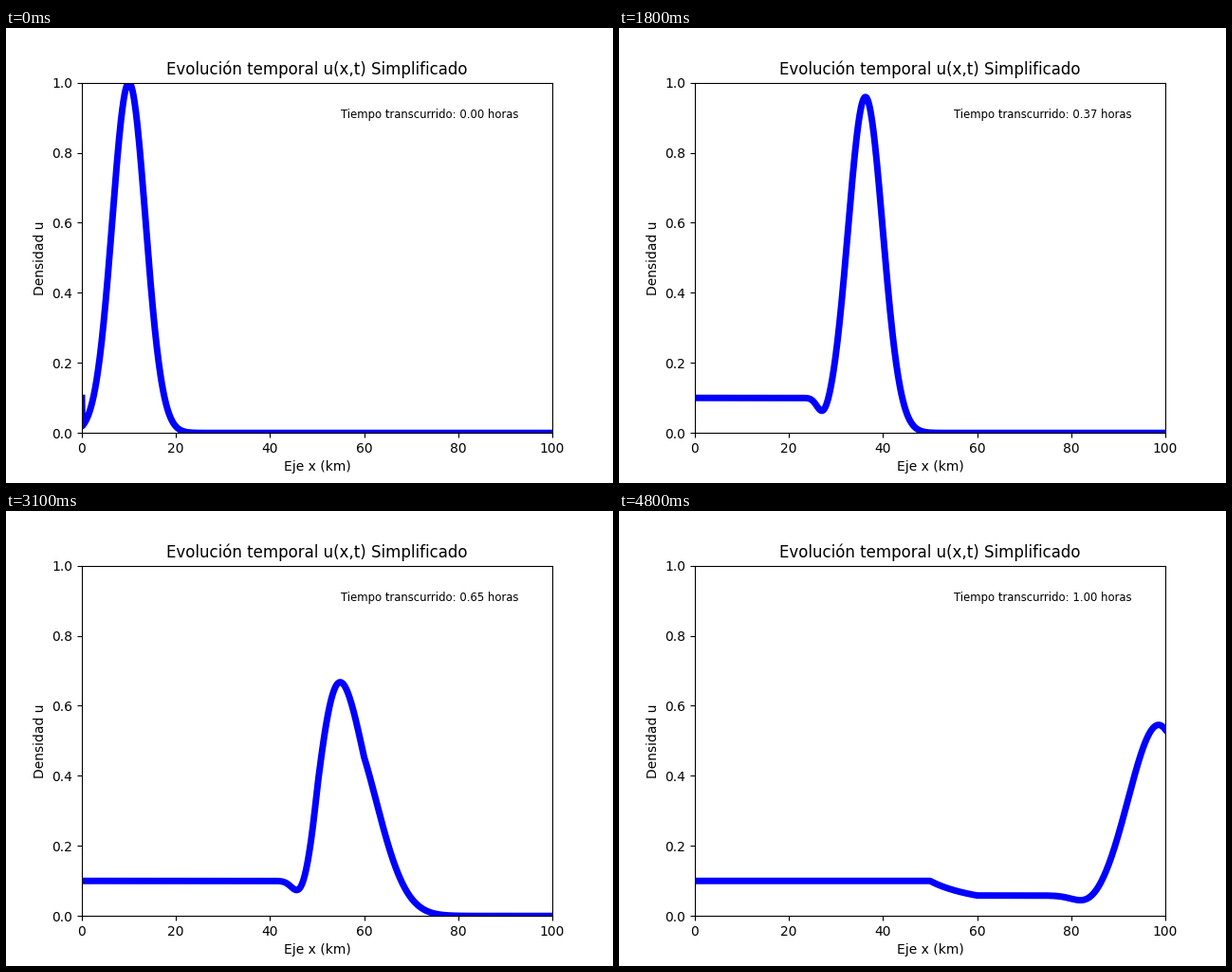
These frames come from a looping animation (640x480 px, 4.9 s). A matplotlib script:

```python
import numpy as np
import matplotlib.pyplot as plt
from matplotlib.animation import FuncAnimation

FRAMES = 49
INTERVAL = 100          # ms
STEPS = 25              # solver steps per frame
FRAME_HOURS = 0.0208333

x = np.linspace(0, 100, 1001)
speed = np.interp(x, [50, 60], [70, 120])
ratio = 1 / speed.max()  # dt / dx at the stability limit


def advance(u):
    """One conservative upwind step with a fixed inflow."""
    flux = speed * u
    new = u.copy()
    new[1:] -= ratio * np.diff(flux)
    return new


def solve():
    u = np.exp(-(x - 10) ** 2 / 25)
    u[0] = 0.1
    states = [u]
    for _ in range(FRAMES - 1):
        for _ in range(STEPS):
            u = advance(u)
        states.append(u)
    return states


states = solve()

fig, ax = plt.subplots(figsize=(6.4, 4.8), dpi=100)
ax.set(xlim=(0, 100), ylim=(0, 1), xlabel="Eje x (km)", ylabel="Densidad u",
       title="Evolución temporal u(x,t) Simplificado")
line, = ax.plot(x, states[0], color="blue", lw=5)
clock = ax.text(55, 0.9, "", fontsize="small")


def update(i):
    line.set_ydata(states[i])
    clock.set_text(f"Tiempo transcurrido: {i * FRAME_HOURS:.2f} horas")
    return line, clock


anim = FuncAnimation(fig, update, frames=FRAMES, interval=INTERVAL,
                     repeat=True, repeat_delay=0)
plt.show()
```
